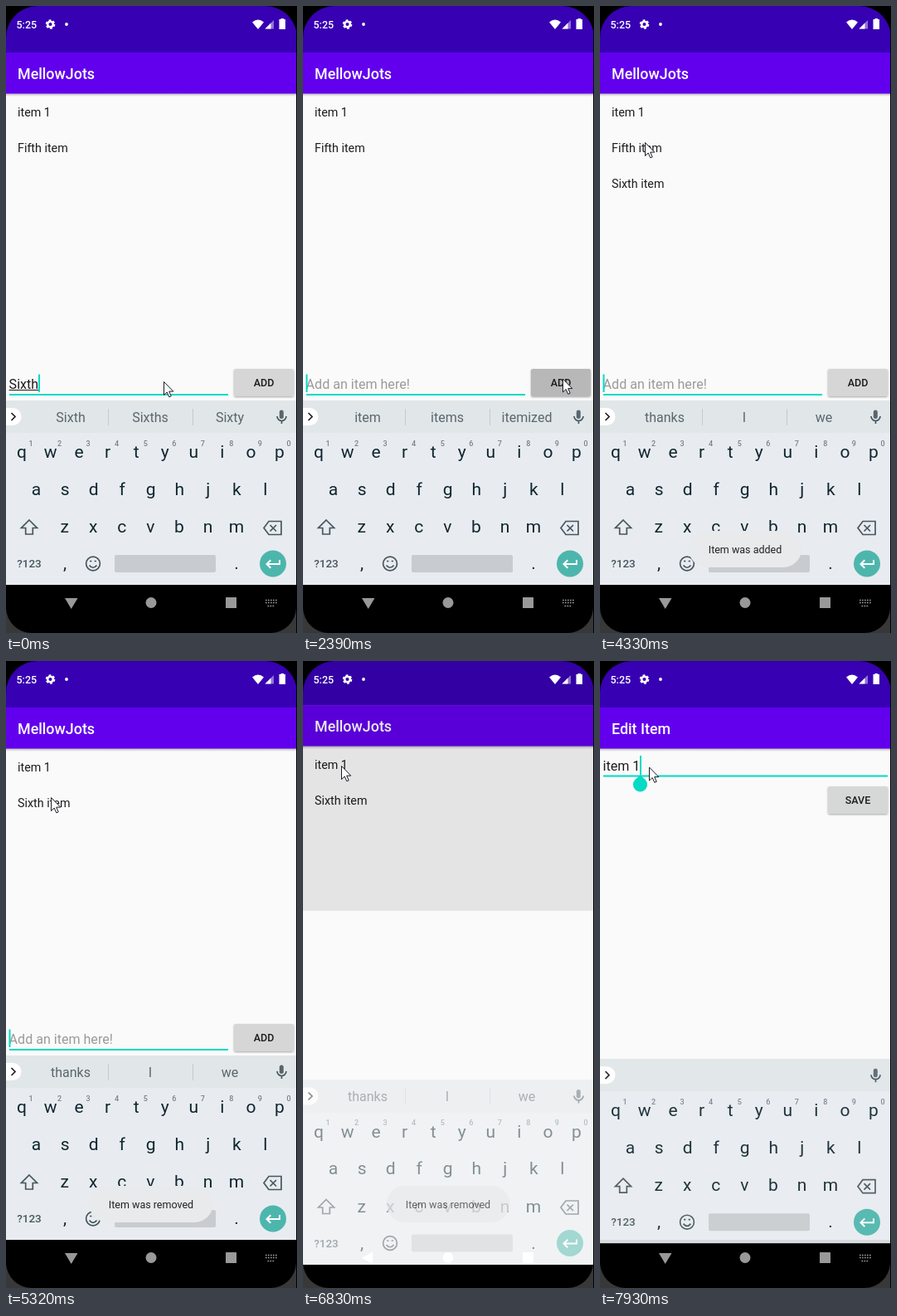
Recreate the animation shown at these times as an HTML page. Size 351 px wide and 755 px high, loop 8 s.

```html
<!DOCTYPE html>
<html lang="en">
<head>
<meta charset="utf-8">
<title>To-do list</title>
<style>
  html, body { margin: 0; width: 100%; height: 100%; overflow: hidden; background: #000; }
  svg { display: block; width: 100vw; height: 100vh; font-family: Roboto, "Noto Sans", sans-serif; }
  text { white-space: pre; }
  .title { font-size: 17.86px; font-weight: 500; fill: #fff; }
  .item { font-size: 14.3px; fill: #1c1c1c; }
  .field { font-size: 16.07px; fill: #1c1c1c; }
  .btn { font-size: 12.5px; font-weight: 500; fill: #1c1c1c; text-anchor: middle; }
  .key { font-size: 21px; fill: #10262f; text-anchor: middle; }
  .num { font-size: 9px; font-weight: 500; fill: #75828a; text-anchor: middle; }
  .sug { font-size: 16px; fill: #5a666d; text-anchor: middle; }
  .toast { font-size: 12.5px; fill: #222; text-anchor: middle; }
  .line { fill: none; stroke: #47565e; stroke-width: 1.7; }
</style>
</head>
<body>
<svg viewBox="0 0 351 755" preserveAspectRatio="none">
  <defs>
    <clipPath id="clip"><rect id="clipBox" width="351" height="755"/></clipPath>
    <linearGradient id="shade" x2="0" y2="1">
      <stop stop-color="#000" stop-opacity=".28"/><stop offset="1" stop-color="#000" stop-opacity="0"/>
    </linearGradient>
    <filter id="lift" x="-10%" y="-20%" width="120%" height="150%">
      <feDropShadow dx="0" dy="1" stdDeviation=".9" flood-opacity=".35"/>
    </filter>
  </defs>
  <rect width="351" height="755"/>

  <g id="list"></g>
  <rect id="dim" width="351" height="697"/>
  <g clip-path="url(#clip)"><g id="edit"></g></g>
  <g id="board"></g>
  <g id="toast">
    <rect id="pill" y="632" height="44" rx="22" fill="#e8eaeb"/>
    <text id="toastText" class="toast" x="175" y="659"></text>
  </g>

  <g id="nav">
    <path id="down" d="M71 713H86.500L78.700 726Z"/>
    <path id="back" d="M84 711.500V726L71 718.700Z"/>
    <circle cx="175" cy="718.500" r="6.500"/>
    <rect x="265" y="712" width="13" height="13" rx=".5"/>
    <path id="dots" d="M313 715.500H327M313 718.500H327M315.500 722.500H324.500" fill="none" stroke="#999" stroke-width="1.700" stroke-dasharray="1.700 1.300"/>
  </g>

  <g fill="#fff">
    <text x="12.500" y="27" font-size="12.500" font-weight="500">5:25</text>
    <circle cx="53.500" cy="22" r="3.300" fill="none" stroke="#fff" stroke-width="2.500"/>
    <circle cx="53.500" cy="22" r="4.900" fill="none" stroke="#fff" stroke-width="1.800" stroke-dasharray="2.800 2.330"/>
    <circle cx="73" cy="22" r="1.900"/>
    <path d="M297 19.500Q304 13.500 311 19.500L304 28Z"/>
    <path d="M323 17V27.500H312.500Z" opacity=".45"/>
    <path d="M319.500 20.500V27.500H312.500Z"/>
    <path d="M331.500 16V15H335V16H337V28H329.500V16Z"/>
  </g>

  <path id="mouse" d="M0 0V16L3.700 12.500L6.300 18.300L8.700 17.300L6.200 11.600H11.300Z" fill="#fff" stroke="#1c1c28"/>

  <path d="M0 0H38A38 38 0 0 0 0 38ZM351 0V38A38 38 0 0 0 313 0ZM350 0H351V755H350Z"/>
  <path d="M0 725A31 31 0 0 0 31 755H0ZM350 725A31 31 0 0 1 319 755H350Z" fill="#383838"/>
</svg>

<script>
const LOOP = 8000;
const $ = id => document.getElementById(id);
const set = (id, name, value) => $(id).setAttribute(name, value);
const move = (id, x, y) => set(id, 'transform', `translate(${x} ${y})`);
const show = (id, on) => set(id, 'opacity', +on);
const text = (cls, x, y, str, extra = '') => `<text class="${cls}" x="${x}" y="${y}" ${extra}>${str}</text>`;
const rect = (x, y, w, h, fill, extra = '') =>
  `<rect x="${x}" y="${y}" width="${w}" height="${h}" fill="${fill}" ${extra}/>`;
const line = d => `<path class="line" d="${d}"/>`;

const page = title =>
  rect(0, 0, 351, 697, '#fafafa') +
  rect(0, 105, 351, 4, 'url(#shade)') +
  rect(0, -30, 351, 86, '#3700b3') +
  rect(0, 56, 351, 49.5, '#6200ee') +
  text('title', 14, 87.5, title);

const button = (id, y, label) =>
  rect(275, y, 72, 33, '#d6d7d7', `id="${id}" rx="2" filter="url(#lift)"`) +
  text('btn', 311, y + 21, label);

$('list').innerHTML = page('MellowJots') +
  text('item', 14, 132.5, 'item 1') +
  text('item', 14, 175.5, '', 'id="row2"') +
  text('item', 14, 218.5, 'Sixth item', 'id="row3"') +
  text('field', 3.6, 460.5, '', 'id="entry"') +
  rect(0, 462, 0, 1, '#1c1c1c', 'id="under"') +
  rect(4, 467, 264, 2, '#03dac5') +
  rect(0, 443.5, 2, 21.5, '#03dac5', 'id="caret"') +
  button('add', 437, 'ADD');

$('edit').innerHTML = page('Edit Item') +
  text('field', 3.6, 131.5, 'item 1') +
  rect(4, 137.5, 343, 1, '#868686', 'id="rule"') +
  `<g id="focus" fill="#03dac5">
    <rect x="4" y="137.500" width="343" height="2"/>
    <rect x="48" y="114" width="2" height="23.500"/>
    <path d="M48.500 137.500L54.800 143A8.600 8.600 0 1 1 42.200 143Z"/>
  </g>` +
  button('save', 151, 'SAVE');

const PITCH = 34.55;
const row = (cls, str, x, y) => [...str].map((c, i) => text(cls, x + i * PITCH, y, c)).join('');

$('board').innerHTML =
  rect(0, 475, 350, 222, '#e8ecf0') +
  rect(0, 475, 350, 39, '#e1e6e9') +
  '<path d="M0 484H8A10.500 10.500 0 0 1 8 505H0Z" fill="#fff"/>' +
  '<path d="M6.500 490L11 494.500L6.500 499" fill="none" stroke="#222" stroke-width="1.700"/>' +
  '<g id="sugs">' + rect(123, 485, 1, 20, '#c4cacd') + rect(225, 485, 1, 20, '#c4cacd') +
  [0, 1, 2].map(i => text('sug', 78 + i * 96, 500.5, '', `id="sug${i}"`)).join('') + '</g>' +
  rect(329.8, 486.5, 5, 10.5, '#5a666d', 'rx="2.5"') +
  line('M327 494A5.500 5.500 0 0 0 338 494M332.500 499.500V503') +
  row('key', 'qwertyuiop', 19, 544) + row('key', 'asdfghjkl', 36.5, 588.5) + row('key', 'zxcvbnm', 70.7, 634) +
  row('num', '1234567890', 30, 529.5) +
  line('M28 619L37.500 628.500H32.300V636H23.700V628.500H18.500Z') +
  line('M317 620.500H332V636.500H317L311 628.500ZM318.500 625L326 632.500M326 625L318.500 632.500') +
  text('key', 28, 676, '?123', 'style="font-size:13.5px;font-weight:500;fill:#47565e"') +
  text('key', 71, 678, ',') + text('key', 278, 678, '.') +
  '<circle class="line" cx="105" cy="671.500" r="8.400"/>' +
  line('M100.500 673.500Q105 679 109.500 673.500M101 668.500h2.400M106.600 668.500h2.400') +
  rect(131, 661, 122, 21, '#c8ccd0', 'rx="2"') +
  '<circle cx="322" cy="671.500" r="16" fill="#4db6ac"/>' +
  '<path d="M330 667V672H315M319.300 667.200L314.500 672L319.300 676.800" fill="none" stroke="#fff" stroke-width="2"/>';

const clamp = v => Math.min(1, Math.max(0, v));
const ramp = (t, start, length) => clamp((t - start) / length);
const smooth = p => p * p * (3 - 2 * p);
const easeOut = p => 1 - (1 - p) ** 2;

const SENT = 2330, REMOVED = 4900, FOCUS = 7550, BLINK = 484;

const words = {
  'Sixth': 'Sixth Sixths Sixty',
  'Sixth ': 'item day form',
  'Sixth i': 'in I is',
  'Sixth it': "it it's its",
  'Sixth ite': 'ite item items',
  'Sixth item': 'item items itemized'
};

const hops = [
  { start: 1560, length: 430, x: 313.5, y: 449 },
  { start: 2800, length: 560, x: 54.5, y: 164.5 },
  { start: 5760, length: 560, x: 46.5, y: 126.5 },
  { start: 6950, length: 240, x: 50.5, y: 134.5 },
  { start: 7350, length: 220, x: 59.5, y: 128 }
];

const toasts = [
  { label: 'Item was added', start: 2430, end: 4700, fade: 370, width: 136 },
  { label: 'Item was removed', start: 4880, end: 7400, fade: 850, width: 149 }
];

function drawEntry(t) {
  const count = Math.max(0, Math.floor((t - 310) / 120));
  const typed = t < SENT ? 'Sixth' + (t < 150 ? '' : ' ') + 'item'.slice(0, count) : '';
  const entry = $('entry');
  entry.textContent = typed || 'Add an item here!';
  entry.style.fill = typed ? '' : '#9a9a9a';

  const width = typed && entry.getComputedTextLength();
  const from = typed.lastIndexOf(' ') + 1;
  const before = from && entry.getSubStringLength(0, from);
  set('under', 'x', 3.6 + before);
  set('under', 'width', width - before);
  set('caret', 'x', 3.5 + +width);

  const idle = t - (t < SENT ? 790 : SENT + 60);
  show('caret', idle < 0 || Math.floor(idle / BLINK) % 2 === 0);

  const press = clamp(1 - Math.abs(t - 2390) / 300);
  const grey = 214 - 30 * press;
  set('add', 'fill', `rgb(${grey},${grey},${grey})`);

  const shown = t < 2480 ? words[typed || 'Sixth item'] : 'thanks I we';
  shown.split(' ').forEach((word, i) => $('sug' + i).textContent = word);
}

function drawToast(t) {
  const { label, start, end, fade, width } = toasts[+(t > toasts[1].start)];
  $('toastText').textContent = label;
  set('pill', 'x', 175 - width / 2);
  set('pill', 'width', width);
  show('toast', ramp(t, start, 300) * (1 - ramp(t, end - fade, fade)));
}

function drawPages(t) {
  const p = ramp(t, 6664, 450);
  const reveal = easeOut(p);
  move('list', 0, -8 * p);
  show('dim', .15 * reveal);
  set('clipBox', 'y', 755 * (1 - reveal));
  move('edit', 0, 30.5 * (1 - p ** 4));
  set('nav', 'fill', p > 0 && p < 1 ? '#fff' : '#999');

  $('row2').textContent = t < REMOVED ? 'Fifth item' : 'Sixth item';
  show('row3', t > 2480 && t < REMOVED);

  const focused = t > FOCUS;
  show('focus', focused);
  show('rule', !focused);
  show('sugs', !focused);

  const hidden = ramp(t, 6700, 260) - easeOut(ramp(t, FOCUS, 517));
  move('board', 0, 59 * hidden);
  show('board', 1 - hidden);

  const open = p === 0 || focused;
  show('down', open);
  show('back', !open);
  show('dots', open);
}

function drawMouse(t) {
  let x = 190.5, y = 452.5;
  for (const hop of hops) {
    const p = smooth(ramp(t, hop.start, hop.length));
    x += (hop.x - x) * p;
    y += (hop.y - y) * p;
  }
  move('mouse', x, y);
}

function draw(t) {
  drawEntry(t);
  drawToast(t);
  drawPages(t);
  drawMouse(t);
}

let start;
function tick(now) {
  start ??= now;
  draw((now - start) % LOOP);
  requestAnimationFrame(tick);
}
draw(0);
requestAnimationFrame(tick);
</script>
</body>
</html>
```
